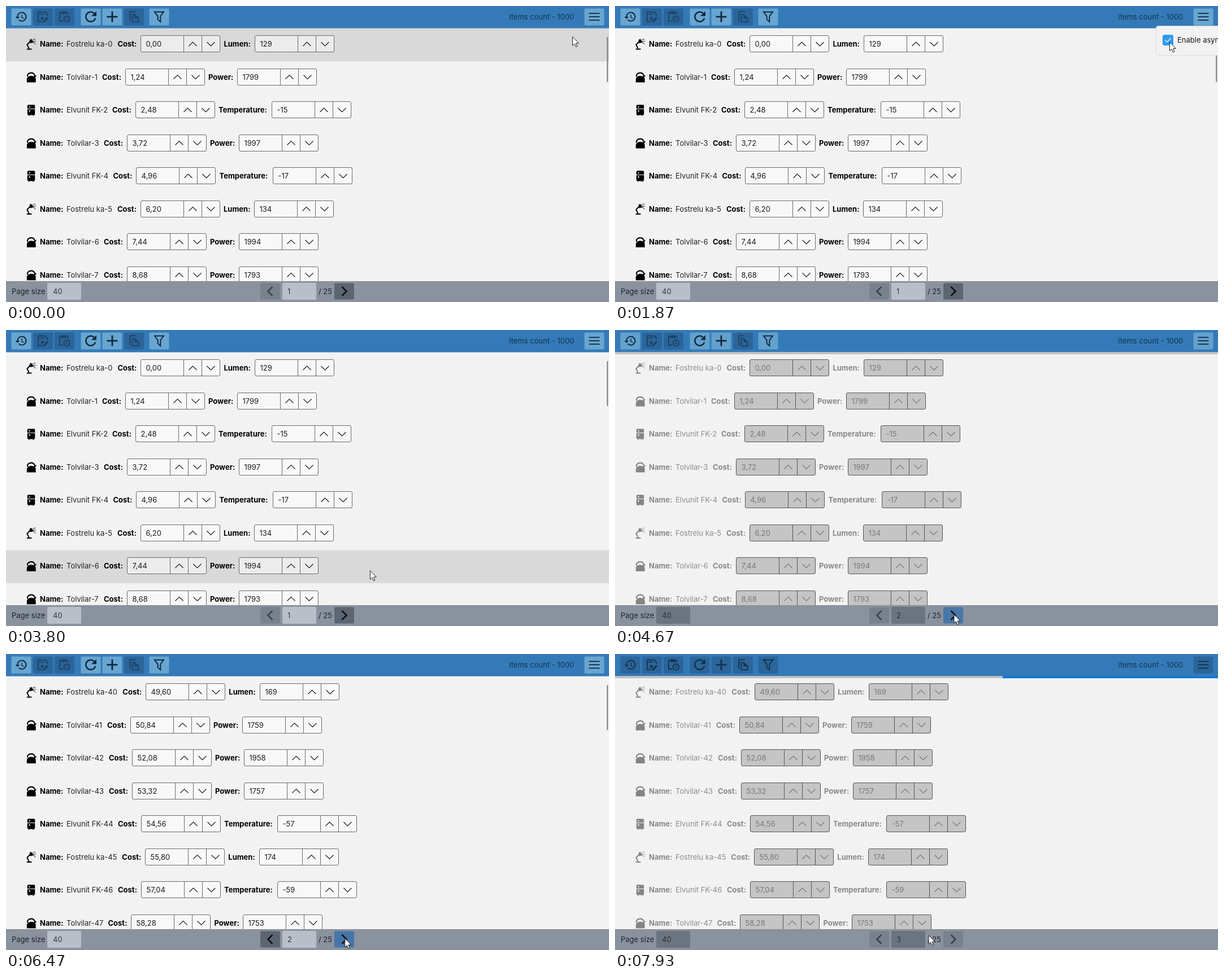
An HTML page that plays this animation: 1067 by 525 pixels, repeating every 8000 ms.

```html
<!DOCTYPE html>
<html lang="en">
<head>
<meta charset="utf-8">
<title>Item list</title>
<style>
html, body { margin: 0; width: 100%; height: 100%; overflow: hidden; background: #f2f2f2; }
svg { display: block; width: 1067px; height: 525px; font: 13px Inter, sans-serif; }
text { white-space: pre; }
.b { font-weight: 700; }
.line { fill: none; stroke: currentColor; }
</style>
</head>
<body>
<svg id="stage" viewBox="0 0 1067 525"></svg>
<script>
const W = 1067, LOOP = 8000, FADE = 400, PITCH = 58.5, TOP = 39.5;
const stage = document.getElementById('stage');

// Cursor path: time, x, y
const path = [
  [0, 1002.5, 54.5], [50, 1002.5, 54.5], [800, 1041, 19], [950, 1041, 19], [1530, 981.5, 64],
  [2230, 981.5, 64], [2600, 889, 191], [3230, 889, 191], [3270, 864.5, 210.5], [3800, 644.5, 426.5],
  [4070, 604, 484], [4330, 600, 504.5], [6440, 600, 504.5], [6800, 598, 503], [7200, 596, 498],
  [7330, 596, 498], [7930, 555, 499], [8000, 555, 499]
];
const loads = [{ at: 4640, bar: 4555, end: 5800 }, { at: 7000, bar: 6985, end: 9000 }];

// Each row: kind and left edge of the first field
const kinds = {
  L: { name: 'Fostrelu ka', label: 'Lumen:', gap: 54.7, value: n => 129 + n },
  K: { name: 'Tolvilar', label: 'Power:', gap: 51, value: n => ([3, 6, 42].includes(n) ? 2000 : 1800) - n },
  F: { name: 'Elvunit FK', label: 'Temperature:', gap: 94.5, value: n => -13 - n }
};
const pages = [
  { types: 'LKFKFLKK', edges: [238.4, 211, 229, 214, 230.5, 238, 214, 214] },
  { types: 'LKKKFLFK', edges: [247.3, 220, 223, 223, 239, 246.3, 239, 221.5] }
];

const clamp = v => Math.min(1, Math.max(0, v));
const mix = (a, b, k) => 'rgb(' + [1, 3, 5].map(i => {
  const p = parseInt(a.substr(i, 2), 16), q = parseInt(b.substr(i, 2), 16);
  return Math.round(p + (q - p) * k);
}) + ')';
const rect = (x, y, w, h, fill, more = '') =>
  `<rect x="${x}" y="${y}" width="${w}" height="${h}" fill="${fill}" ${more}/>`;
const text = (x, y, s, fill, cls = '') => `<text x="${x}" y="${y}" fill="${fill}" class="${cls}">${s}</text>`;
const line = (d, width = 2) => `<path class="line" d="${d}" stroke-width="${width}"/>`;
const solid = d => `<path fill="currentColor" fill-rule="evenodd" d="${d}"/>`;
const place = (x, y, scale, color, body, more = '') =>
  `<g transform="translate(${x} ${y}) scale(${scale})" color="${color}" ${more}>${body}</g>`;

// Symmetric curve with control points (.4, 0) and (.6, 1)
function ease(p) {
  p = clamp(p);
  let lo = 0, hi = 1, s;
  for (let i = 0; i < 24; i++) {
    s = (lo + hi) / 2;
    const x = 1.2 * (1 - s) ** 2 * s + 1.8 * (1 - s) * s * s + s ** 3;
    if (x < p) lo = s; else hi = s;
  }
  return s * s * (3 - 2 * s);
}

const tools = [
  { x: 27, on: 1, art: line('M5 12a8 8 0 1 1 2.4 5.7') + line('M13 8v5l3.7 2.2', 1.6) + solid('M1 12h8l-4 4z') },
  { x: 65.5, art: line('M10 21H3V3h13l4 4v3M5 7h9') + solid('M8 16a3 3 0 0 1 6-1l-4 4zM12 20l7.5-7.5 2.5 2.5-7.5 7.5H12z') },
  { x: 103.5, art: line('M10 20H3V4h15v4') + solid('M6 2h9v5H6z') + line('M11 16a5.500 5.500 0 1 0 11 0a5.500 5.500 0 1 0-11 0') + line('M16 13v3l2 1.5', 1.5) },
  { x: 150, on: 1, art: line('M18.400 5.700A9 9 0 1 0 20.600 14.500', 2.6) + solid('M13 10.500h9.500V1.500z') },
  { x: 188, on: 1, art: line('M12 2v20M2 12h20', 3) },
  { x: 226.5, art: line('M9 8h4.500l7 7v6.500H9zM4.500 20V2.500h11') + solid('M13 8l7 7h-7z') },
  { x: 271, on: 1, art: line('M3.500 3h17l-6 8v10.500l-5-4.500v-6z') },
  { x: 1041, on: 1, art: line('M2 5.700h20M2 12h20M2 18.300h20') }
];

const rowIcons = {
  L: line('M8 20L4.500 13 10 7') + solid('M4 20h9v2H4zM9 4l3-2 5 6.500-7 1.500z') +
    '<path class="line" stroke="#2f6b2f" stroke-width="1.4" stroke-dasharray="1.8 1.3" d="M15 4l5-2M17 6.500l4 0M17 9l3 3"/>',
  K: line('M5.500 11C4 7 8 4 12 4c4 0 6 2 6.500 5', 2.2) +
    solid('M4 21.500v-5C4 11.500 8 9.500 12 9.500c2 0 3.500 1 5 .5 1.500-.8 2-2 5-2l-2.500 4.500c1 1.500 1 3 1 4v5z'),
  F: solid('M7 2h10a2 2 0 0 1 2 2v5H5V4a2 2 0 0 1 2-2zM8 5v2h2V5zM5 10h14v9a2 2 0 0 1-2 2v1h-2v-1H9v1H7v-1a2 2 0 0 1-2-2zM8 12v3h2v-3z')
};

function spinner(left, cy, value, off) {
  const ink = off ? '#777777' : '#1a1a1a', edge = off ? '#555555' : '#6a6a6a';
  const x = Math.floor(left) + .5, top = Math.round(cy - 15.5) + .5;
  return rect(x, top, 140, 29, off ? '#c5c5c5' : 'rgba(255,255,255,.5)', `rx="2.5" stroke="${edge}"`) +
    `<path d="M${x + 76} ${top}v29M${x + 108} ${top}v29" stroke="${edge}"/>` +
    text(x + 9, cy + 4.7, value, ink) +
    place(x + 92, cy, 1, ink, line('M-7 3.5l7-7 7 7', 1.2)) +
    place(x + 124, cy, 1, ink, line('M-7-3.5l7 7 7-7', 1.2));
}

function row(page, i, off, hover) {
  const { types, edges } = pages[page], type = types[i], kind = kinds[type];
  const n = page * 40 + i, cy = 67.5 + PITCH * i, x = edges[i], y = cy + 4.7;
  const bold = off ? '#888888' : '#000000', soft = off ? '#8c8c8c' : '#222222';
  const cost = (n * 1.24).toFixed(2).replace('.', ',');
  return (hover ? rect(0, TOP + PITCH * i, W, PITCH, '#d9d9d9') : '') +
    place(33, cy - 11.2, .96, '#000', rowIcons[type], off ? 'opacity=".45"' : '') +
    text(60, y, 'Name:', bold, 'b') + text(107, y, `${kind.name}-${n}`, soft) +
    text(x - 41, y, 'Cost:', bold, 'b') + spinner(x, cy, cost, off) +
    text(x + 147, y, kind.label, bold, 'b') + spinner(x + 147 + kind.gap, cy, kind.value(n), off);
}

function toolbar(fade, hover) {
  return rect(0, 0, W, TOP, '#347ab8') + tools.map((tool, i) => {
    const base = i == 7 && hover ? '#5596cc' : '#68a6d1';
    const fill = tool.on ? mix(base, '#2b659a', fade) : '#2b659a';
    const ink = mix(tool.on ? '#10283e' : '#1b4469', '#14324d', fade);
    return rect(tool.x - 17.5, 4.5, 35, 30, fill, 'rx="2"') + place(tool.x - 11.4, 7.7, .95, ink, tool.art);
  }).join('') + text(890, 24, 'Items count - 1000', '#143350');
}

function footer(number, hasPrev, fade, off, hover) {
  const field = off ? '#6c747f' : '#b9bfc9', ink = off ? '#2b3037' : '#33383f';
  const arrow = (x, d, enabled, over) => {
    const k = enabled ? fade : 1;
    return rect(x, 491.5, 35, 29, mix(over ? '#4576a9' : '#5d6570', '#79818c', k), 'rx="2"') +
      place(x + 17.5, 506, 1, mix('#0d1014', '#3c434b', k), line(d, 2.6));
  };
  return rect(0, 488, W, 37, '#8a929e') + text(10, 510.7, 'Page size', '#20252b') +
    rect(73, 491, 60, 30, field, 'rx="2"') + text(83, 510.7, '40', ink) +
    arrow(450, 'M4-8l-8 8 8 8', hasPrev) +
    rect(489, 491, 60, 30, field, 'rx="2"') + text(498, 510.7, number, ink) +
    text(553, 510.7, '/ 25', '#20252b') + arrow(581, 'M-4-8l8 8-8 8', true, hover);
}

function progress(t) {
  const x1 = W * (-.72 + 1.92 * ease(t / 1500)), x2 = W * (-.9 + 1.896 * ease((t - 750) / 1250));
  return rect(0, 39, W, 4, '#c2c2c2') + rect(x1, 39, W * .4, 4, '#0f78d7') + rect(x2, 39, W * .6, 4, '#0f78d7');
}

function popup(t) {
  const checked = t >= 1870, pressed = t >= 1730;
  return rect(957.5, 35.5, 130, 52, '#f2f2f2', 'rx="4" stroke="#dcdcdc"') +
    rect(969.5, 51.5, 18, 18, checked ? '#2f9bf3' : pressed ? '#b5b5b5' : '#f7f7f7',
      `rx="2.5" stroke="${checked ? '#2f9bf3' : '#808080'}"`) +
    (checked ? place(978.5, 60.5, 1, '#fff', line('M-5 0l3.5 3.5L5-3.5', 1.2)) : '') +
    text(995, 65.2, 'Enable async', '#1a1a1a');
}

function cursorAt(t) {
  const i = Math.max(1, path.findIndex(p => p[0] >= t));
  const [t0, x0, y0] = path[i - 1], [t1, x1, y1] = path[i], k = (t - t0) / (t1 - t0);
  return [x0 + (x1 - x0) * k, y0 + (y1 - y0) * k];
}

function scene(t) {
  const [x, y] = cursorAt(t);
  const started = loads.filter(l => t >= l.at), last = started[started.length - 1];
  const off = !!last && t < last.end;
  const fade = !last ? 0 : off ? clamp((t - last.at) / FADE) : 1 - clamp((t - last.end) / FADE);
  const page = t < loads[0].end ? 0 : 1;
  const open = t >= 960 && t < 2650;
  const still = t > 2600 && t < 3270;
  const hoverRow = open || still || off || y < TOP || y >= 488 ? -1 : Math.floor((y - TOP) / PITCH);
  const overMenu = y < 35 && x > 1023;
  const overNext = y > 491 && x > 581;
  let out = '';
  for (let i = 0; i < 8; i++) out += row(page, i, off, i == hoverRow);
  out += off ? '' : rect(1063.3, 55, 2, 80, '#7a7a7a', 'rx="1"');
  out += toolbar(fade, overMenu) + footer(1 + started.length, page > 0, fade, off, overNext);
  if (off) out += progress(t - last.bar);
  if (open) out += popup(t);
  return out + `<path transform="translate(${x} ${y})" d="M0 0V15.5l3.5-3L6 18l2.5-1L6 11.5h5z" fill="#fff" stroke="#222" stroke-linejoin="round"/>`;
}

let shown = '';
function draw(now) {
  const next = scene(now % LOOP);
  if (next !== shown) stage.innerHTML = shown = next;
  requestAnimationFrame(draw);
}
draw(performance.now());
</script>
</body>
</html>
```
